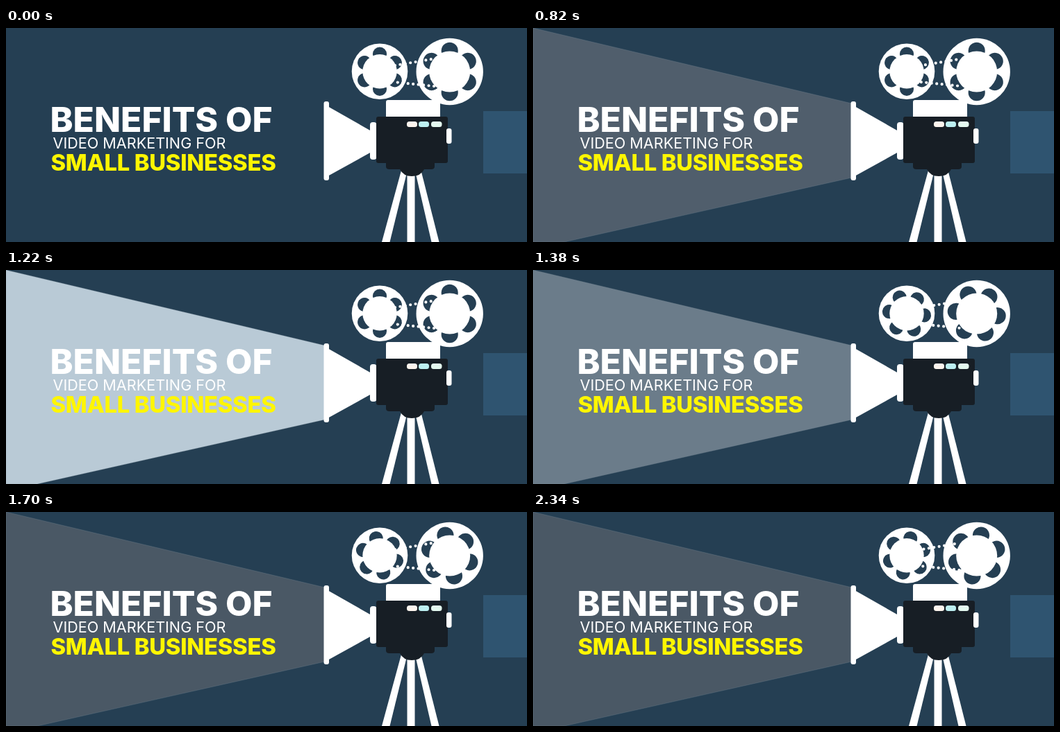
These frames come from a looping animation (750x309 px, 2.42 s). An HTML page:

```html
<!DOCTYPE html>
<html lang="en">
<head>
<meta charset="utf-8">
<title>Benefits of video marketing</title>
<style>
  html, body { margin: 0; width: 100%; height: 100%; overflow: hidden; background: #253f53; }
  svg { display: block; width: 750px; height: 309px; }
  text { font-family: Inter, "Open Sans", sans-serif; }
  .title { font-size: 49.8px; font-weight: 800; }
  .middle { font-size: 21.6px; font-weight: 400; }
  .accent { font-size: 32.8px; font-weight: 800; letter-spacing: -.3px; }
</style>
</head>
<body>
<svg viewBox="0 0 750 309">
  <rect width="750" height="309" fill="#253f53"/>
  <rect x="687" y="120" width="63" height="90" fill="#2f5470"/>
  <path id="beam" d="M0 0L459 109V216L45 309H0Z" stroke="#8796a2" stroke-opacity=".25"/>

  <g fill="#fff">
    <path d="M569.500 204L576.500 211L552.500 309H541Z"/>
    <path d="M577.500 210H588.500V309H577.500Z"/>
    <path d="M590 211L597 204L623.500 309H612.500Z"/>
    <rect x="547" y="104" width="78" height="28" rx="3"/>
    <path d="M463 113L526 149V179L463 214Z"/>
    <rect x="457.500" y="106" width="7.500" height="114" rx="3"/>
    <rect x="524" y="136" width="9.500" height="54" rx="4"/>
  </g>
  <g fill="#171e25">
    <rect x="533" y="128" width="103" height="67" rx="3"/>
    <path d="M547 194H617V200Q617 204 612 204H602Q597 214 584 214Q572 214 567 204H552Q547 204 547 200Z"/>
  </g>
  <rect x="634" y="145" width="7.500" height="22" rx="3" fill="#fff"/>
  <rect x="577" y="135" width="15" height="8" rx="3.500" fill="#fdf5ee"/>
  <rect x="594" y="135" width="15" height="8" rx="3.500" fill="#bdf0f2"/>
  <rect x="612" y="135" width="15.500" height="8" rx="3.500" fill="#e4f9f0"/>

  <g id="reels"></g>
  <g id="film" fill="none" stroke="#fff" stroke-width="4.200" stroke-linecap="round" stroke-dasharray="0 7.500">
    <path d="M560 54L613 45"/>
    <path d="M616 84L558 78"/>
  </g>

  <text class="title" x="63.500" y="150" fill="#fff">BENEFITS OF</text>
  <text class="middle" x="67.500" y="174" fill="#fff">VIDEO MARKETING FOR</text>
  <text class="accent" x="64.500" y="206" fill="#fff600">SMALL BUSINESSES</text>
</svg>
<script>
  const LOOP = 2420, FIRST = 100, STEP = 80;
  const TURN = -12, FEED = 2.5;

  // step, red, green, blue
  const glow = [
    [0, 37, 63, 83], [1, 62, 84, 100], [2, 82, 100, 114], [3, 93, 110, 122],
    [10, 80, 94, 108], [14, 96, 112, 126], [15, 185, 202, 214], [16, 138, 155, 168],
    [17, 107, 124, 138], [18, 91, 107, 121], [19, 81, 96, 110],
    [21, 74, 88, 101], [29, 74, 88, 101]
  ];

  const beam = document.getElementById('beam');
  const film = document.getElementById('film');
  const reels = document.getElementById('reels');

  function reel(x, y, r) {
    let holes = '';
    for (let a = 0; a < 360; a += 60) {
      holes += `<circle cy="-25" r="10" transform="rotate(${a})"/>`;
    }
    return `<g transform="translate(${x} ${y}) scale(${r / 40})">
      <circle r="40" fill="#fff"/><g class="spin" fill="#253f53">${holes}</g>
      <circle r="24.500" fill="#fff"/></g>`;
  }

  reels.innerHTML = reel(538, 62.7, 40.3) + reel(638.7, 63, 48.2);
  const spins = reels.querySelectorAll('.spin');

  function beamColor(n) {
    const i = Math.max(1, glow.findIndex(g => g[0] >= n));
    const a = glow[i - 1], b = glow[i];
    const p = (n - a[0]) / (b[0] - a[0]);
    const rgb = [1, 2, 3].map(c => Math.round(a[c] + (b[c] - a[c]) * p));
    return `rgb(${rgb})`;
  }

  function draw(t) {
    const n = t < FIRST ? 0 : 1 + Math.floor((t - FIRST) / STEP);
    beam.setAttribute('fill', beamColor(n));
    beam.style.visibility = n ? 'visible' : 'hidden';
    spins.forEach(s => s.setAttribute('transform', `rotate(${n * TURN})`));
    film.setAttribute('stroke-dashoffset', n * FEED);
  }

  const start = performance.now();
  function tick() {
    draw((performance.now() - start) % LOOP);
    requestAnimationFrame(tick);
  }
  tick();
</script>
</body>
</html>
```
